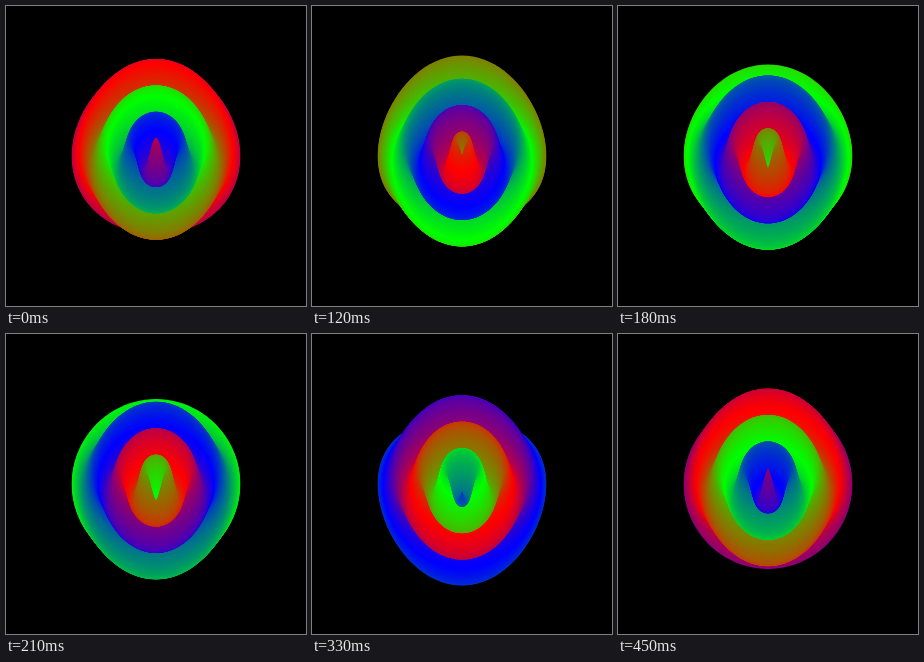
Write an HTML page with a canvas that moves like this. It is 300 by 300 pixels and loops after 0.48 s.

```html
<!DOCTYPE html>
<html lang="en">
<head>
<meta charset="utf-8">
<title>Colour ripple</title>
<style>
  html, body { margin: 0; width: 100%; height: 100%; overflow: hidden; background: #000; }
  canvas { display: block; width: 300px; height: 300px; }
</style>
</head>
<body>
<canvas id="stage" width="300" height="300"></canvas>
<script>
const ctx = document.getElementById('stage').getContext('2d');
const LOOP = 480, STEP = 30, TAU = Math.PI * 2;
const RADIUS = 84.3, SWING = 17.3, WAVE = 26.4;
const HUE_SHIFT = 0.085, CORNERS = 96;

// Linear blend through red, green, blue and back to red.
function tint(h) {
  const p = (h - Math.floor(h)) * 3;
  const i = Math.floor(p) % 3;
  const f = p - Math.floor(p);
  const rgb = [0, 0, 0];
  rgb[i] = Math.round(255 * (1 - f));
  rgb[(i + 1) % 3] = Math.round(255 * f);
  return `rgb(${rgb})`;
}

// A disc pushed up or down, most at the middle column and not at all at the rim.
function disc(r, shift) {
  ctx.beginPath();
  for (let i = 0; i < CORNERS; i++) {
    const a = TAU * i / CORNERS;
    const x = r * Math.cos(a);
    const lift = shift * (1 - (x / RADIUS) ** 2);
    ctx.lineTo(150 + x, 150 + r * Math.sin(a) + lift);
  }
  ctx.fill();
}

function draw(t) {
  ctx.fillStyle = '#000';
  ctx.fillRect(0, 0, 300, 300);
  for (let r = RADIUS; r > 0; r -= 0.25) {
    ctx.fillStyle = tint(t - r / RADIUS - HUE_SHIFT);
    disc(r, -SWING * Math.cos(TAU * (t - r / WAVE)));
  }
}

const start = performance.now();
let shown = -1;
function tick() {
  const ms = (performance.now() - start) % LOOP;
  const step = Math.floor(ms / STEP);
  if (step !== shown) {
    shown = step;
    draw(step * STEP / LOOP);
  }
  requestAnimationFrame(tick);
}
tick();
</script>
</body>
</html>
```
